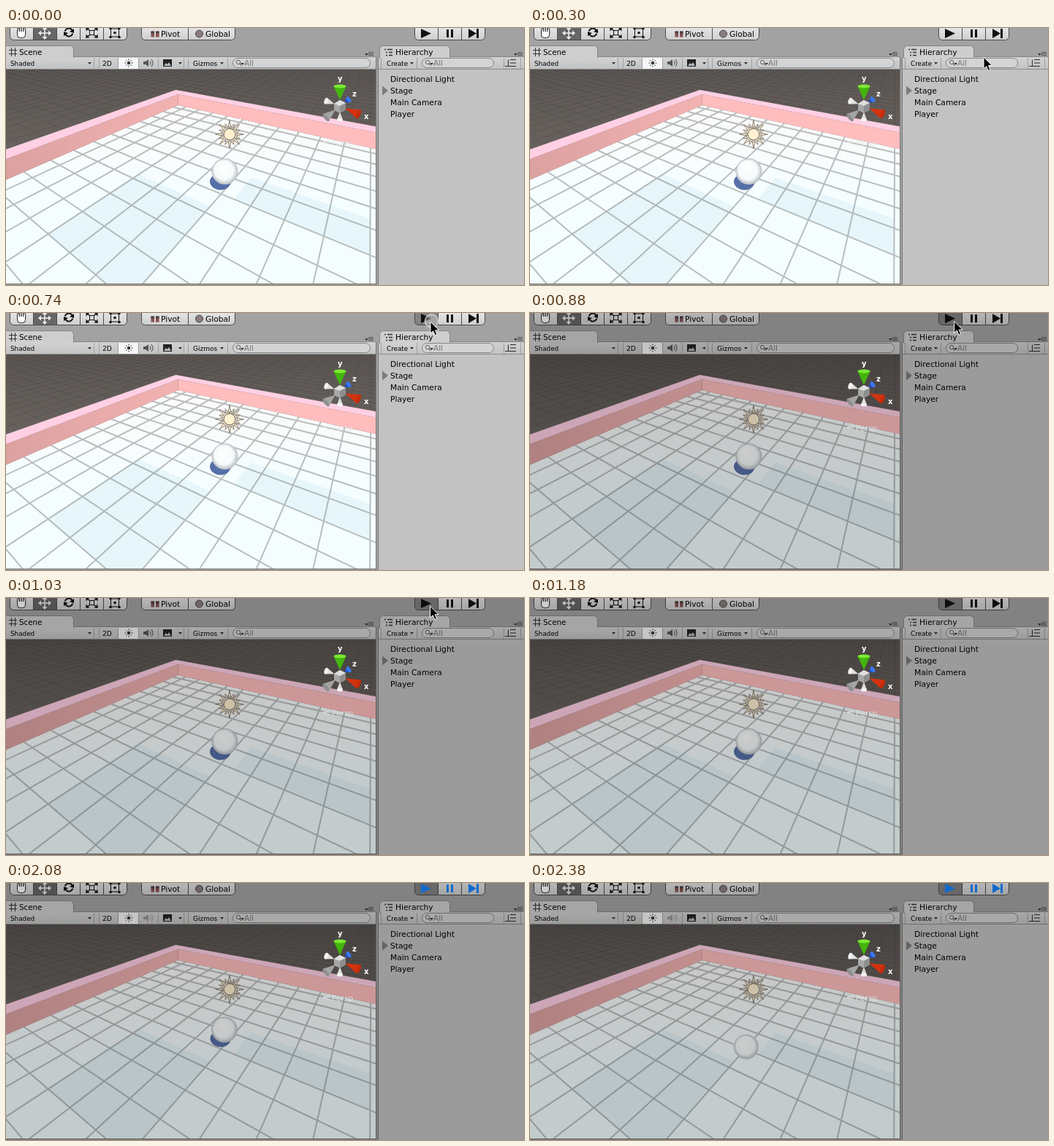
These frames come from a looping animation (709x353 px, 2830 ms). An HTML page with a canvas:

```html
<!DOCTYPE html>
<html>
<head>
<meta charset="utf-8">
<style>
html, body { margin: 0; width: 100%; height: 100%; overflow: hidden; }
canvas { display: block; }
</style>
</head>
<body>
<canvas id="stage" width="709" height="353"></canvas>
<script>
const g = document.getElementById('stage').getContext('2d');
const LOOP = 2830, TAU = Math.PI * 2;

function rect(x, y, w, h, fill) { g.fillStyle = fill; g.fillRect(x, y, w, h); }
function paint(fill, line, width = 1) {
  if (fill) { g.fillStyle = fill; g.fill(); }
  if (line) { g.strokeStyle = line; g.lineWidth = width; g.stroke(); }
}
function poly(points, fill, line, width) {
  g.beginPath();
  for (let i = 0; i < points.length; i += 2) g.lineTo(points[i], points[i + 1]);
  g.closePath();
  paint(fill, line, width);
}
function lines(color, width, ...segments) {
  g.beginPath();
  for (const [a, b, c, d] of segments) { g.moveTo(a, b); g.lineTo(c, d); }
  paint(null, color, width);
}
function oval(x, y, rx, ry, fill, line, width, turn = 0) {
  g.beginPath(); g.ellipse(x, y, rx, ry, turn, 0, TAU);
  paint(fill, line, width);
}
function arc(x, y, r, a, b, color, width) {
  g.beginPath(); g.arc(x, y, r, a, b);
  paint(null, color, width);
}
function box(x, y, w, h, r, fill, line) {
  g.beginPath(); g.roundRect(x, y, w, h, r);
  paint(fill, line);
}
function text(s, x, y, size = 10.7, color = '#000', weight = '') {
  g.font = `${weight} ${size}px "DejaVu Sans", "Open Sans", sans-serif`;
  g.fillStyle = color;
  g.fillText(s, x, y);
}
function fade(x0, y0, x1, y1, a, b) {
  const f = g.createLinearGradient(x0, y0, x1, y1);
  f.addColorStop(0, a); f.addColorStop(1, b);
  return f;
}
// Runs part(i, cos, sin) for n directions around a circle
function around(n, part) {
  for (let i = 0; i < n; i++) part(i, Math.cos(i * TAU / n), Math.sin(i * TAU / n));
}
const drop = (x, y) => poly([x, y, x + 5, y, x + 2.5, y + 3], '#333');
const play = (x, y, w, color) => poly([x, y - 6.5, x + w, y, x, y + 6.5], color);

// Room coordinates in tiles to screen: u along the right wall, v along the left, z up
const A = 0.0318, B = 0.0467, HORIZON = -9, TALL = 15, THICK = 0.8;
function room(u, v, z = 0) {
  const w = 1 - A * u - B * v;
  return [(235.5 + 280 * A * u - 500 * B * v) / w, HORIZON + (115 - z) / w];
}
const shape = (fill, ...corners) => poly(corners.flatMap(c => room(...c)), fill);
const tile = (u0, v0, u1, v1, fill) => shape(fill, [u0, v0], [u1, v0], [u1, v1], [u0, v1]);
function gridLines(from, color, width) {
  const paths = [];
  for (let k = from; k < 26; k++) {
    const u = k + 0.64, v = k + 0.5;
    if (A * u < 0.75) paths.push([...room(u, from), ...room(u, (0.8 - A * u) / B)]);
    if (B * v < 0.75) paths.push([...room(from, v), ...room((0.8 - B * v) / A, v)]);
  }
  lines(color, width, ...paths);
}

function sun(x, y) {
  around(16, (i, c, s) => {
    const end = i % 2 ? 15.5 : 19.5;
    poly([x + c * 10 - s * 1.8, y + s * 10 + c * 1.8, x + c * end, y + s * end,
      x + c * 10 + s * 1.8, y + s * 10 - c * 1.8], '#f8e9c9', '#81776a', 0.9);
  });
  oval(x, y, 8, 8, '#fff0d0', '#857a68', 1.3);
}

function ball(t) {
  const k = Math.min(3, Math.max(0, Math.floor((t - 1930) / 150)));
  const fall = Math.min(28, 4.5 * k * k), p = fall / 28;
  const x = 299.5 - 3.5 * p, y = 197 + fall, r = 18 - p;
  oval(293 + 3 * p, 211.5 + 0.59 * fall, 14, 11, '#566fa8', null, 1, 0.1);
  const glow = g.createRadialGradient(x - 4, y - 6, 2, x, y, r);
  glow.addColorStop(0, '#ffffff');
  glow.addColorStop(0.7, '#f4fafa');
  glow.addColorStop(1, '#b9bec3');
  oval(x, y, r, r, glow);
}

function scene(t) {
  g.save();
  g.beginPath(); g.rect(0, 57, 506, 294); g.clip();
  rect(0, 57, 506, 294, fade(0, 57, 0, 190, '#5c5753', '#6a6460'));
  gridLines(-26, 'rgba(45,42,40,.16)', 1);

  g.save();
  shape(fade(0, 106, 0, 240, '#fbfbfb', '#f5feff'), [0, 0], [20, 0], [0, 16]);
  g.clip();
  tile(3.64, 7.2, 6.64, 10.5, '#e7f6fa');
  tile(7.1, 5.08, 10.64, 6.5, '#e7f6fa');
  gridLines(0, 'rgba(110,112,112,.45)', 2);
  g.restore();

  const T = -THICK;
  shape(fade(0, 0, 236, 0, '#dca1a1', '#f3b2b2'), [0, 0], [0, 0, TALL], [0, 16, TALL], [0, 16]);
  shape('#ffbdbd', [0, 0], [0, 0, TALL], [20, 0, TALL], [20, 0]);
  shape('#ffd0e4', [0, 0, TALL], [0, 16, TALL], [T, 16, TALL], [T, T, TALL], [20, T, TALL], [20, 0, TALL]);
  ball(t);
  sun(306, 146);
  g.restore();
}

function cone(degrees, length, half, side, cap) {
  const a = degrees * TAU / 360, c = Math.cos(a), s = Math.sin(a);
  const x = 457 + c * length, y = 107 + s * length;
  poly([457 + c * 8, 107 + s * 8, x - s * half, y + c * half, x + s * half, y - c * half], side);
  oval(x, y, 2.5, half, cap, null, 1, a);
}
function axes() {
  cone(-36, 15, 4.5, '#1f4fd0', '#3a78f0');
  cone(200, 20, 4.5, '#e0e0e0', '#f4f4f4');
  cone(90, 19, 4, '#dcdcdc', '#f2f2f2');
  poly([449, 104, 457, 99, 465, 103, 465, 112, 457, 117, 449, 113], '#a8a8a8');
  poly([449, 104, 457, 99, 465, 103, 457, 107], '#dedede');
  poly([457, 107, 465, 103, 465, 112, 457, 117], '#8e8e8e');
  cone(-90, 27, 8.5, '#43b40e', '#7bea32');
  cone(24, 28, 6.5, '#d53210', '#c42c0a');
  cone(140, 25, 6.5, '#a4a4a4', '#8f8f8f');
  text('y', 454, 73, 10, '#fff', 'bold');
  text('z', 474, 94, 10, '#fff', 'bold');
  text('x', 490, 125, 10, '#fff', 'bold');
  const pale = 'rgba(228,228,228,.85)';
  lines(pale, 1, [443, 154, 434, 157], [434, 157, 443, 160], [434, 157, 444, 157]);
  text('Persp', 446, 162, 10.7, pale);
}

function tools() {
  for (let i = 0; i < 4; i++) box(15.5 + i * 2.8, -1 + Math.abs(i - 1.5), 2.8, 9, 1.4, '#fff', '#222');
  box(15.5, 6, 11, 7.5, [1, 1, 4, 4], '#fff', '#222');
  rect(16, 5, 10, 3, '#fff');
  around(4, (i, c, s) => {
    lines('#eee', 1.6, [53, 7, 53 + c * 6, 7 + s * 6]);
    poly([53 + c * 9, 7 + s * 9, 53 + c * 5 - s * 3.5, 7 + s * 5 + c * 3.5,
      53 + c * 5 + s * 3.5, 7 + s * 5 - c * 3.5], '#eee');
  });
  for (const side of [1, -1]) {
    const a = side > 0 ? 0.3 : 0.3 + Math.PI;
    arc(86, 6, 5.5, a, a + 2.3, '#111', 2);
    poly([86 + 7 * side, 6 - 5 * side, 86 + 7 * side, 6 + side, 86 + side, 6 - side], '#111');
  }
  box(114.5, 3.5, 6, 6, 0, '#ddd', '#111');
  box(143.5, 1, 11, 11, 0, null, '#111');
  oval(149, 6.5, 1.8, 1.8, '#111');
  for (const a of [-1, 1]) for (const b of [-1, 1]) {
    const x = 117.5 + a * 8, y = 6.5 + b * 7;
    lines('#111', 1.5, [117.5 + a * 3, 6.5 + b * 3, x, y]);
    poly([x, y, x - a * 5, y, x, y - b * 5], '#111');
    oval(149 + a * 6, 6.5 + b * 6, 1.8, 1.8, '#111');
  }
}

function toolbar(t) {
  const face = fade(0, 0, 0, 16, '#e4e4e4', '#cfcfcf');
  function group(x, w, n, active, dark) {
    for (let i = 0; i < n; i++)
      box(x + i * w + .5, -6.5, w, 23, [0, 0, i == n - 1 ? 5 : 0, i ? 0 : 5], i == active ? dark : face, '#4a4a4a');
  }
  group(5, 32, 5, 1, '#666');
  group(185, 64, 2);
  group(559, 32, 3, t >= 740 ? 0 : -1, '#828282');
  tools();

  for (const x of [198.5, 205]) {
    rect(x, 4.5, 4.5, 8, '#8a5252');
    rect(x, 4.5, 4.5, 3, '#4c4040');
  }
  text('Pivot', 212, 12);
  oval(264.5, 8, 5, 5, '#8b7d7d', '#444');
  text('Global', 273, 12);

  const ink = t < 2080 ? '#111' : '#1684ff';
  play(568, 7.5, 14, ink);
  rect(603, 2, 3, 11, ink); rect(609, 2, 3, 11, ink);
  play(633, 7.5, 11, ink);
  rect(644, 1, 3, 13, ink);
}

function search(x, w) {
  box(x + .5, 41.5, w, 13, 6.5, '#d4d4d4', '#858585');
  oval(x + 8, 47, 2.7, 2.7, null, '#666');
  lines('#666', 1.2, [x + 10, 49, x + 12, 52]);
  drop(x + 11, 48);
  text('All', x + 16, 52, 10.5, '#777');
}
function menu(x) {
  drop(x, 35);
  for (let y = 33.5; y < 38; y += 2) lines('#555', 1, [x + 5, y, x + 12, y]);
}
function panels(t) {
  rect(510, 40, 199, 313, '#c2c2c2');
  for (const [x, w] of [[0, 506], [510, 199]]) {
    rect(x, 40, w, 17, fade(0, 40, 0, 57, '#d2d2d2', '#c2c2c2'));
    rect(x, 39, w, 1, '#858585');
    rect(x, 56, w, 1, '#8b8b8b');
  }
  for (const [x, w] of [[-4.5, 97], [511.5, 96]]) {
    box(x, 24.5, w, 17, [5, 5, 0, 0], '#cecece', '#858585');
    rect(x + 1, 40, w - 1, 2, '#d0d0d0');
  }
  for (const x of [506, 509]) rect(x, 40, 1, 313, '#777');
  rect(0, 351, 507, 1, '#777');

  for (const d of [0, 5]) lines('#333', 1, [4, 30.5 + d, 15, 30.5 + d], [7.5 + d, 27, 7.5 + d, 39]);
  text('Scene', 18, 37, 10.3);
  for (let i = 0; i < 3; i++) {
    const x = i ? 520 : 518, y = 29.5 + i * 4;
    lines('#333', 1.4, [x, y, x + 2, y], [x + 4, y, 529, y]);
  }
  text('Hierarchy', 533, 37);
  menu(491); menu(695);

  for (const x of [120, 127, 153, 181, 208, 243, 249, 303, 513, 562, 681, 704]) rect(x, 41, 1, 15, '#a0a0a0');
  rect(154, 41, 27, 15, '#f6f6f6');
  text('Shaded', 6, 52, 8.8); drop(112, 47);
  text('2D', 132, 52, 9.2);
  oval(168, 48, 2.2, 2.2, '#333');
  around(8, (i, c, s) => lines('#333', 1, [168 + c * 3.5, 48 + s * 3.5, 168 + c * 5.5, 48 + s * 5.5]));
  const sound = t < 1930 ? '#555' : '#999';
  poly([188, 46, 191, 46, 195, 43, 195, 53, 191, 50, 188, 50], sound);
  for (const r of [3, 6]) arc(195, 48, r, -.9, .9, sound, 1.1);
  rect(215, 43, 12, 10, '#222');
  poly([216, 52, 219, 48, 221, 50, 223, 47, 226, 52], '#bbb');
  drop(236, 47);
  text('Gizmos', 256, 52, 9); drop(293, 47);
  search(310, 188);
  text('Create', 521, 52, 8.8); drop(553, 47);
  search(569, 98);
  for (let y = 43.5; y < 53; y += 4.5) lines('#333', 1.1, [690, y, 698, y]);
  lines('#333', 1.1, [683, 52.5, 690, 52.5], [687.5, 43.5, 687.5, 52.5]);

  ['Directional Light', 'Stage', 'Main Camera', 'Player']
    .forEach((name, i) => text(name, 526, 74 + i * 16));
  play(515, 86, 8, '#7c7c7c');
}

// The pointer glides in with decaying steps, clicks and vanishes
function cursor(t) {
  const k = Math.floor((t - 300 + 7) / 146.67);
  if (k < 0 || k > 5) return;
  if (k == 3) oval(582.5, 11, 9, 9, 'rgba(215,215,215,.4)', '#e0e0e0', 1.3);
  g.save();
  g.translate(580.5 + 40.5 * 0.23 ** k, 11 + 29 * 0.33 ** k);
  poly([0, 0, 0, 16, 3.7, 12.7, 6.3, 18.6, 9, 17.4, 6.5, 11.7, 11.5, 11.5], '#000', '#fff');
  g.restore();
}

function draw(t) {
  rect(0, 0, 709, 353, '#a2a2a2');
  toolbar(t);
  panels(t);
  scene(t);
  if (t >= 880) {
    g.globalCompositeOperation = 'multiply';
    rect(0, 0, 709, 353, '#cccccc');
    g.globalCompositeOperation = 'source-over';
  }
  axes();
  cursor(t);
}

const start = performance.now();
function tick() {
  draw((performance.now() - start) % LOOP);
  requestAnimationFrame(tick);
}
tick();
</script>
</body>
</html>
```
